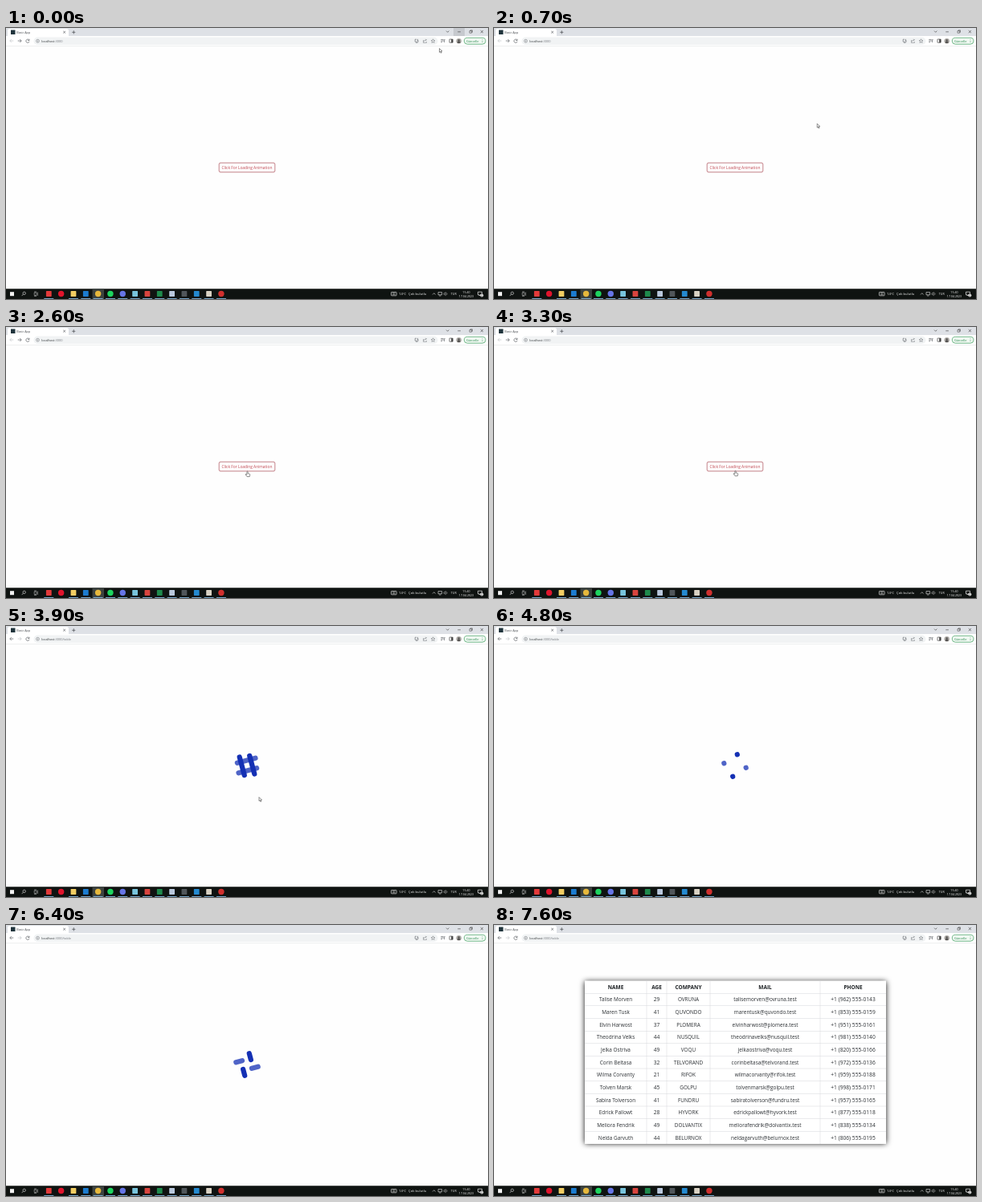
An HTML page with a canvas for the animation above (8000 ms loop, 600 by 338 pixels).

```html
<!DOCTYPE html>
<html lang="en">
<head>
<meta charset="utf-8">
<title>Loading demo</title>
<style>
html, body { margin: 0; width: 100%; height: 100%; overflow: hidden; background: #fefefe; }
canvas { display: block; width: 600px; height: 338px; }
</style>
</head>
<body>
<canvas id="stage"></canvas>
<script>
const W = 600, H = 338, LOOP = 8000, STEP = 100;
const NAVIGATE = 3500, LOADED = 6500, SPIN_START = 3420;
const canvas = document.getElementById('stage');
const ctx = canvas.getContext('2d');
const dpr = window.devicePixelRatio || 1;
canvas.width = W * dpr;
canvas.height = H * dpr;
ctx.scale(dpr, dpr);

const people = [
  ['Talise Morven', 29, 'OVRUNA', '(962) 555-0143'],
  ['Maren Tusk', 41, 'QUVONDO', '(853) 555-0159'],
  ['Elvin Harwost', 37, 'PLOMERA', '(951) 555-0161'],
  ['Theodrina Velks', 44, 'NUSQUIL', '(981) 555-0140'],
  ['Jelka Ostriva', 49, 'VOQU', '(820) 555-0166'],
  ['Corin Beltasa', 32, 'TELVORAND', '(972) 555-0136'],
  ['Wilma Corvanty', 21, 'RIFOK', '(959) 555-0188'],
  ['Tolven Marsk', 45, 'GOLPU', '(998) 555-0171'],
  ['Sabira Tolverson', 41, 'FUNDRU', '(957) 555-0165'],
  ['Edrick Pallowt', 28, 'HYVORK', '(877) 555-0118'],
  ['Meliora Fendrik', 49, 'DOLVANTIX', '(838) 555-0134'],
  ['Nelda Garvuth', 44, 'BELURNOX', '(806) 555-0195']
];
const headers = ['NAME', 'AGE', 'COMPANY', 'MAIL', 'PHONE'];
const edges = [113, 190, 215, 269, 406, 488];

// Taskbar apps: shape and colour
const apps = [
  ['s', '#e23a3a'], ['c', '#e0142c'], ['s', '#f2cd62'], ['s', '#1c7cd0'], ['c', '#e6b83c'],
  ['c', '#1ed45f'], ['c', '#6675e6'], ['s', '#78c4dc'], ['s', '#d8443e'], ['s', '#1f8a4c'],
  ['s', '#b9c8dc'], ['s', '#50565a'], ['s', '#2489d0'], ['s', '#d9d2c4'], ['c', '#d0302e']
];

function box(x, y, w, h, fill, r = 0) {
  ctx.beginPath();
  ctx.roundRect(x, y, w, h, r);
  ctx.fillStyle = fill;
  ctx.fill();
}

function frame(x, y, w, h, color, r = 0, lw = 0.6) {
  ctx.beginPath();
  ctx.roundRect(x, y, w, h, r);
  ctx.strokeStyle = color;
  ctx.lineWidth = lw;
  ctx.stroke();
}

function disc(x, y, r, fill) {
  ctx.beginPath();
  ctx.arc(x, y, r, 0, Math.PI * 2);
  ctx.fillStyle = fill;
  ctx.fill();
}

function draw(d, color, lw = 0.7) {
  ctx.strokeStyle = color;
  ctx.lineWidth = lw;
  ctx.stroke(new Path2D(d));
}

function text(s, x, y, size, color, align = 'left', weight = 400) {
  ctx.font = `${weight} ${size}px "Open Sans", "Noto Sans", sans-serif`;
  ctx.textAlign = align;
  ctx.textBaseline = 'alphabetic';
  ctx.fillStyle = color;
  ctx.fillText(s, x, y);
}

function bezier(x1, y1, x2, y2) {
  const at = (a, b, u) => 3 * a * u * (1 - u) ** 2 + 3 * b * u * u * (1 - u) + u ** 3;
  return x => {
    let lo = 0, hi = 1;
    for (let i = 0; i < 24; i++) {
      const mid = (lo + hi) / 2;
      if (at(x1, x2, mid) < x) lo = mid; else hi = mid;
    }
    return at(y1, y2, lo);
  };
}
const ease = bezier(0.25, 0.1, 0.25, 1);

function drawBrowser(t) {
  const moved = t >= NAVIGATE;
  const dark = '#5f6368', pale = '#c4c7cb';

  box(0, 0, W, 10.5, '#dee1e6');
  if (t < STEP) box(557, 0, 14, 10, '#c6c9ce');
  box(2, 1, 76, 10, '#fff', [2.5, 2.5, 0, 0]);
  box(6, 2.5, 5.5, 5.5, '#20343c');
  text('Basic App', 13.2, 6.8, 3.75, '#45494d');
  draw('M71.2 3.8l2.8 2.8M74 3.8l-2.8 2.8', '#45494d', 0.6);
  draw('M82.2 5.3h4.2M84.3 3.2v4.2', '#45494d');
  draw('M548 3.6l1.7 1.7 1.7-1.7M562.3 4.8h3.6', '#333', 0.6);
  draw('M577 3.6h2.6v2.6h-2.6zM578 3.6v-.8h2.5v2.5h-.8', '#333', 0.5);
  draw('M590.8 3l3.2 3.2M594 3l-3.2 3.2', '#333', 0.6);

  box(0, 10, W, 12, '#fff');
  draw('M9.3 16H4.8M6.8 14l-2 2 2 2', moved ? dark : pale);
  draw('M14.7 16h4.5M17.2 14l2 2-2 2', moved ? pale : dark);
  draw('M28.7 15a2.1 2.1 0 1 0 .3 1.8M29 13.7v1.8h-1.8', dark);
  box(34.5, 11.5, 503, 9.4, '#f1f3f4', 4.7);
  draw('M41.4 16.2a1.9 1.9 0 1 1-3.8 0a1.9 1.9 0 1 1 3.8 0M39.5 15.9v1.3M39.5 15v.4', dark, 0.5);
  const host = 'localhost';
  text(host, 44.2, 17.6, 3.9, '#303438');
  const w = ctx.measureText(host).width;
  text(moved ? ':3000/table' : ':3000', 44.2 + w, 17.6, 3.9, '#777b80');

  draw('M511 14.2h-1.8v3h4v-1M510 18.3h2.5M512.5 13.8v2M511.6 15l.9.9.9-.9', dark, 0.6);
  draw('M520.3 15.5h-.8v2.8h4v-1.2M520.8 16.8c0-1.6 1-2 2.6-2M522.4 13.8l1 1-1 1', dark, 0.5);
  draw('M531.6 13.8l.7 1.6 1.7.2-1.3 1.1.4 1.7-1.5-.9-1.5.9.4-1.7-1.3-1.1 1.7-.2z', dark, 0.5);
  draw('M541.3 14.4h3.4M541.3 16h3.4M541.3 17.6h1.8M545.5 18v-3.4h1.2', dark, 0.7);
  frame(552, 14, 4.2, 4.2, '#444', 0.3, 0.7);
  box(554.2, 14, 2, 4.2, '#444');
  disc(563.7, 16.2, 3.2, '#a9a6a2');
  disc(563.7, 15.4, 1.1, '#4b4a49');
  box(562, 16.6, 3.4, 2.2, '#4b4a49', [1.2, 1.2, 0.5, 0.5]);
  box(570.3, 12.2, 26.7, 8, '#f0f8f2', 4);
  frame(570.3, 12.2, 26.7, 8, '#3a9b5b', 4, 0.7);
  text('Güncelle', 573, 17.6, 3.8, '#24864a');
  for (const y of [14.6, 16.2, 17.8]) disc(593, y, 0.45, '#24864a');
  box(0, 22, W, 0.5, '#dfe1e4');
}

function drawTaskbar() {
  box(0, 325.3, W, 12.7, '#0f1311');
  box(5, 329.2, 5, 5, '#f2f2f2');
  draw('M24.4 330.8a1.7 1.7 0 1 1-3.4 0a1.7 1.7 0 1 1 3.4 0M21.4 332.1l-1.7 2', '#eee', 0.6);
  draw('M35.2 330h2.8v3.4h-2.8zM39.4 329.5v4.4M35 329h3M35 334.4h3', '#ddd', 0.5);
  box(107.5, 325.3, 14.5, 12.7, '#3c423f');
  apps.forEach(([shape, color], i) => {
    const x = 53.3 + i * 15.33;
    if (shape === 'c') disc(x, 331.5, 3.7, color);
    else box(x - 3.4, 328.1, 6.8, 6.8, color, 0.6);
    if (i !== 1) box(x - 6, 337.1, 12, 0.9, '#7fb4dc');
  });

  frame(479.5, 329.4, 6.6, 4.4, '#ddd', 0.6, 0.7);
  draw('M481 330.8h3.6M481 332.3h3.6', '#ddd', 0.6);
  text('14°C', 489, 333.2, 4.2, '#f0f0f0');
  text('Çok bulutlu', 501, 333.2, 4.2, '#f0f0f0');
  draw('M531 332.5l1.8-1.8 1.8 1.8', '#eee', 0.6);
  draw('M538 329.6h4.6v3.2H538zM539.2 334h2.2', '#eee', 0.6);
  draw('M545 330.8h1l1.3-1.2v4l-1.3-1.2h-1zM548.6 330.3q1 1.3 0 2.6', '#ccc', 0.5);
  text('TUR', 557.2, 333, 3.7, '#f0f0f0', 'center');
  text('15:40', 573, 330.5, 3.7, '#f0f0f0', 'center');
  text('17.04.2023', 573, 336.2, 3.6, '#f0f0f0', 'center');
  draw('M587.5 329.2h5v3.6h-2.2l-1.2 1.2v-1.2h-1.6z', '#f0f0f0', 0.7);
  disc(592.3, 333.6, 2, '#e8e8e8');
  text('2', 592.3, 334.7, 3, '#111', 'center');
}

function drawButton() {
  frame(265.2, 168.2, 69.6, 11.6, '#b5616a', 1.8, 0.8);
  text('Click For Loading Animation', 300, 175.8, 4.85, '#c0434e', 'center');
}

// Four pills sliding and stretching inside a box turned by 165 degrees
function drawLoader(t) {
  const size = 31.25, thick = size / 5;
  const lat = (size - thick) / 2, off = lat - thick;
  const p = ((t - SPIN_START) % 2000) / 2000;
  let len = thick, pos;
  if (p < 0.35) {
    const e = ease(p / 0.35);
    len += (size - thick) * e;
    pos = lat * (1 - e);
  } else if (p < 0.7) {
    const e = ease((p - 0.35) / 0.35);
    len = size - (size - thick) * e;
    pos = -lat * e;
  } else {
    pos = lat * (2 * ease((p - 0.7) / 0.3) - 1);
  }
  const pill = (x, y, w, h, color) => box(x - w / 2, y - h / 2, w, h, color, thick / 2);
  ctx.save();
  ctx.translate(300, 174);
  ctx.rotate(165 * Math.PI / 180);
  for (const s of [1, -1]) pill(s * pos, -s * off, len, thick, 'rgba(20,48,180,0.75)');
  for (const s of [1, -1]) pill(s * off, s * pos, thick, len, '#1430b4');
  ctx.restore();
}

function drawTable() {
  const x = edges[0], y = 69.5, w = edges[5] - x, rowH = 15.66, h = rowH * 13;
  ctx.save();
  ctx.shadowColor = 'rgba(0,0,0,0.95)';
  ctx.shadowBlur = 7 * dpr;
  box(x, y, w, h, '#fff');
  ctx.restore();
  for (let i = 1; i < 13; i++) box(x, y + i * rowH - 0.25, w, 0.5, '#d5d8db');
  for (let i = 1; i < 5; i++) box(edges[i] - 0.25, y, 0.5, h, '#d5d8db');

  const mid = i => (edges[i] + edges[i + 1]) / 2;
  headers.forEach((s, i) => text(s, mid(i), y + 10.3, 6.5, '#1d2124', 'center', 700));
  people.forEach(([name, age, firm, phone], r) => {
    const mail = `${name.replace(' ', '')}@${firm}.test`.toLowerCase();
    [name, age, firm, mail, '+1 ' + phone].forEach((s, i) => {
      const size = i === 1 || i === 4 ? 6.7 : 6.42;
      text(s, mid(i), y + rowH * (r + 1) + 10.2, size, '#2b2f33', 'center');
    });
  });
}

// Pointer path: time, x, y
const path = [
  [0, 539.5, 25.5], [1200, 319.5, 176], [1500, 319.5, 176], [2400, 300.5, 180],
  [3500, 300.5, 179], [3900, 315, 213.5], [4300, 326, 344]
];

function drawPointer(t) {
  const i = path.findIndex(k => k[0] > t);
  if (i < 0) return;
  const [t0, x0, y0] = path[i - 1], [t1, x1, y1] = path[i];
  const u = (t - t0) / (t1 - t0), e = u * u * (3 - 2 * u);
  const x = x0 + (x1 - x0) * e, y = y0 + (y1 - y0) * e;
  const hand = t < NAVIGATE && x > 265 && x < 335 && y > 168 && y < 181;
  const shape = new Path2D(hand
    ? 'M-.6 .6q.6-1 1.2 0v2.2l2 .5q.7.3.6 1.1l-.5 2.3h-3.2l-1.8-2.5q-.2-.9.7-.6l1 .7z'
    : 'M0 0v4.8l1.1-1 .8 1.9.8-.4-.8-1.8h1.6z');
  ctx.save();
  ctx.translate(x, y);
  ctx.fillStyle = '#fff';
  ctx.fill(shape);
  ctx.strokeStyle = '#333';
  ctx.lineWidth = 0.55;
  ctx.lineJoin = 'round';
  ctx.stroke(shape);
  ctx.restore();
}

function render(now) {
  const t = Math.floor((now % LOOP) / STEP) * STEP;
  box(0, 0, W, H, '#fefefe');
  drawBrowser(t);
  if (t < NAVIGATE) drawButton();
  else if (t < LOADED) drawLoader(t);
  else drawTable();
  drawTaskbar();
  drawPointer(t);
}

const start = performance.now();
function tick() {
  render(performance.now() - start);
  requestAnimationFrame(tick);
}
tick();
</script>
</body>
</html>
```
